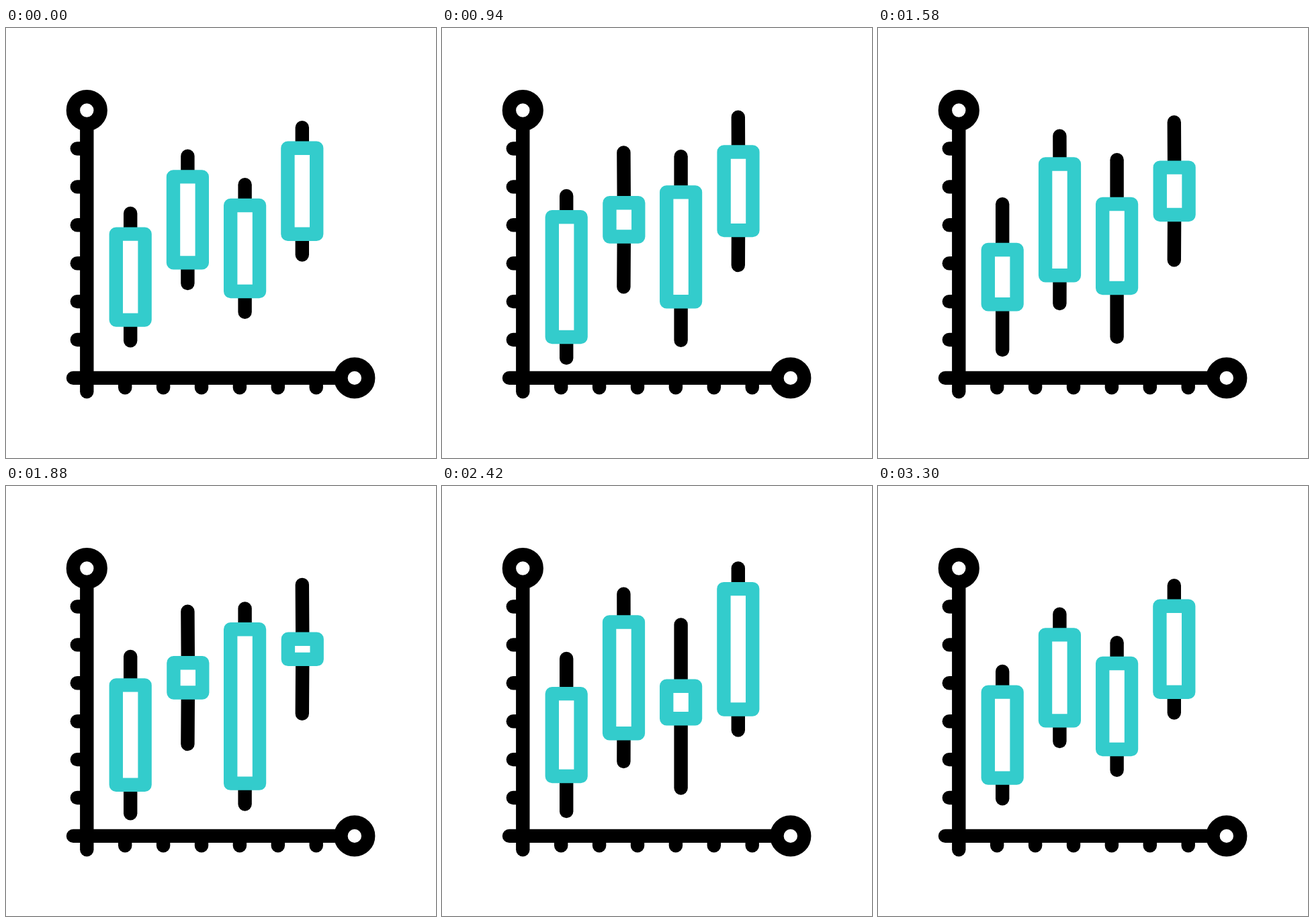
Animation of 640 by 640 pixels, one loop 3420 ms. Source, as an HTML page with a canvas:

```html
<!DOCTYPE html>
<html lang="en">
<head>
<meta charset="utf-8">
<title>Candlestick chart</title>
<style>
  html, body { margin: 0; height: 100%; overflow: hidden; background: #fff; }
  canvas { display: block; }
</style>
</head>
<body>
<canvas id="stage" width="640" height="640"></canvas>
<script>
const ctx = document.getElementById('stage').getContext('2d');
const LOOP = 3420, STEP = 20, SEGMENT = 600, STAGGER = 100;
const STROKE = 20.4, TICK = 56.9;
const ORIGIN_X = 120.3, ORIGIN_Y = 520.9;
const REST_BODY = 74.2, WICK_GAP = 30.7;

// Half-heights of the stretched and squeezed body; lift raises the squeezed one.
const candles = [
  { level: 0, tall: 100.2, short: 48.3, lift: 0 },
  { level: 2, tall: 112.4, short: 23, lift: 0 },
  { level: 1, tall: 125.2, short: 29.8, lift: 6.3 },
  { level: 3, tall: 100, short: 21.5, lift: 0 },
].map((shape, i) => ({
  x: 185.2 + 85.2 * i,
  y: 370.6 - 42.6 * shape.level,
  delay: STAGGER * (3 - i),
  poses: makePoses(shape, i % 2 === 0),
}));

// Each candle alternates between two poses, starting and ending at rest.
function makePoses({ tall, short, lift }, tallFirst) {
  const pose = (body, wick = body + WICK_GAP, dx = 0, dy = 0) => ({ body, wick, dx, dy });
  const rest = pose(REST_BODY), high = pose(tall);
  const low = tallFirst
    ? pose(short, (rest.wick + high.wick) / 2, 0, -lift)
    : pose(short, rest.wick, 0.5, -lift);
  const pair = tallFirst ? [high, low] : [low, high];
  return [rest, ...pair, ...pair, rest];
}

const smooth = u => u * u * (3 - 2 * u);

function poseAt({ poses, delay }, time) {
  const last = poses.length - 1;
  const progress = Math.min(Math.max((time - delay) / SEGMENT, 0), last);
  const i = Math.min(Math.floor(progress), last - 1);
  const k = smooth(progress - i), from = poses[i], to = poses[i + 1];
  const mix = key => from[key] + (to[key] - from[key]) * k;
  return { body: mix('body'), wick: mix('wick'), dx: mix('dx'), dy: mix('dy') };
}

function line(x1, y1, x2, y2) {
  ctx.beginPath();
  ctx.moveTo(x1, y1);
  ctx.lineTo(x2, y2);
  ctx.stroke();
}

function ring(x, y) {
  ctx.beginPath();
  ctx.arc(x, y, STROKE, 0, Math.PI * 2);
  ctx.fill();
  ctx.stroke();
}

function drawAxes() {
  ctx.strokeStyle = '#000';
  line(ORIGIN_X, 143, ORIGIN_X, 541.3);
  line(100, ORIGIN_Y, 498.4, ORIGIN_Y);
  for (let i = 1; i <= 6; i++) {
    const x = ORIGIN_X + i * TICK, y = ORIGIN_Y - i * TICK;
    line(105.8, y, ORIGIN_X - 5, y);
    line(x, ORIGIN_Y + 5, x, 535.4);
  }
  ring(ORIGIN_X, 122.5);
  ring(518.8, ORIGIN_Y);
}

function drawCandle(candle, time) {
  const pose = poseAt(candle, time);
  const wick = pose.wick - STROKE / 2, body = pose.body - STROKE / 2;
  const x = candle.x + pose.dx, y = candle.y + pose.dy;
  ctx.strokeStyle = '#000';
  for (const side of [-1, 1]) {
    line(candle.x, candle.y + side * wick, x, y + side * body);
  }
  ctx.strokeStyle = '#33cccc';
  ctx.beginPath();
  ctx.rect(x - 21.4, y - body, 42.8, body * 2);
  ctx.fill();
  ctx.stroke();
}

function render(now) {
  const time = Math.floor((now % LOOP) / STEP) * STEP;
  ctx.fillStyle = '#fff';
  ctx.fillRect(0, 0, 640, 640);
  ctx.lineWidth = STROKE;
  ctx.lineCap = ctx.lineJoin = 'round';
  drawAxes();
  candles.forEach(candle => drawCandle(candle, time));
}

let start;
function frame(now) {
  start ??= now;
  render(now - start);
  requestAnimationFrame(frame);
}
render(0);
requestAnimationFrame(frame);
</script>
</body>
</html>
```
